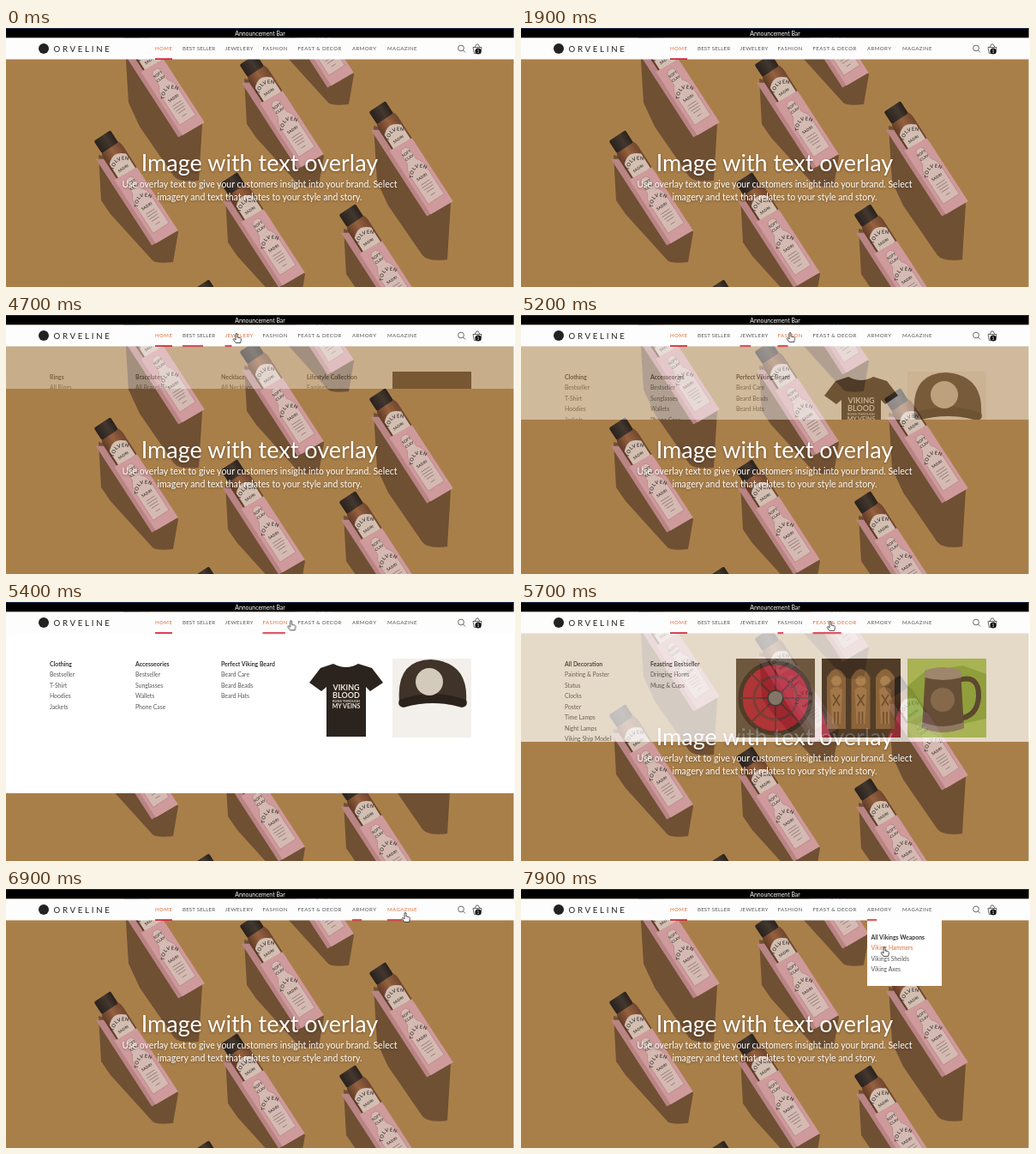
Write an HTML page that moves like this. It is 594 by 302 pixels and loops after 8 s.

```html
<!DOCTYPE html>
<html lang="en">
<head>
<meta charset="utf-8">
<title>Shop menu</title>
<style>
html, body { margin: 0; width: 100%; height: 100%; overflow: hidden; background: #fff; }
.stage { position: relative; width: 594px; height: 302px; overflow: hidden; font-family: Lato, "Open Sans", sans-serif; }
.stage > svg { position: absolute; left: 0; top: 0; display: block; }
.mid { text-anchor: middle; }

.copy { fill: #fff; text-shadow: 0 1px 3px rgba(50, 25, 0, .45); }
.label { font-size: 5.8px; font-weight: 700; fill: #453a37; letter-spacing: .4px; }
.label .small { font-size: 4.4px; letter-spacing: .2px; }

.nav text { font-size: 6.1px; letter-spacing: .4px; fill: #555; }
.nav .now { fill: #d9713a; }
.bar { fill: #d3182c; transform-box: fill-box; transform-origin: 0 0; }

.stage > .menu { top: 36px; background: #fff; opacity: 0; }
.menu text { font-size: 6.8px; fill: #555; }
.menu .head { font-size: 6.9px; font-weight: 700; fill: #333; }
.menu .tee text { font-weight: 700; fill: #eee6da; }
.stage > .drop { left: 404px; }

/* One shared 8 s clock */
.nav .link, .nav .bar, .menu, .pick, .cursor { animation: 8s linear infinite; }
.nav .now, .nav .home { animation: none; }
.best.link { animation-name: best-ink; }    .best.bar { animation-name: best-bar; }
.jewel.link { animation-name: jewel-ink; }  .jewel.bar { animation-name: jewel-bar; }
.fash.link { animation-name: fash-ink; }    .fash.bar { animation-name: fash-bar; }
.feast.link { animation-name: feast-ink; }  .feast.bar { animation-name: feast-bar; }
.arm.link { animation-name: arm-ink; }      .arm.bar { animation-name: arm-bar; }
.mag.link { animation-name: mag-ink; }      .mag.bar { animation-name: mag-bar; }
.menu.jewels { animation-name: jewel-menu; }
.menu.fashion { animation-name: fash-menu; }
.menu.decor { animation-name: feast-menu; }
.menu.drop { animation-name: arm-menu; }
.menu .pick { animation-name: pick; }
.cursor { animation-name: move; }

@keyframes best-ink  { 0%, 51.25% { fill: #555 } 52.5%, 57% { fill: #d9713a } 58.3%, 100% { fill: #555 } }
@keyframes jewel-ink { 0%, 57.5% { fill: #555 } 58.75%, 62.25% { fill: #d9713a } 63.5%, 100% { fill: #555 } }
@keyframes fash-ink  { 0%, 62.875% { fill: #555 } 64.1%, 67.5% { fill: #d9713a } 68.75%, 100% { fill: #555 } }
@keyframes feast-ink { 0%, 68% { fill: #555 } 69.25%, 77.75% { fill: #d9713a } 79%, 100% { fill: #555 } }
@keyframes arm-ink   { 0%, 78.125% { fill: #555 } 79.4%, 83.25% { fill: #d9713a } 84.5%, 90.6% { fill: #555 }
                       91.9%, 95.75% { fill: #d9713a } 97%, 100% { fill: #555 } }
@keyframes mag-ink   { 0%, 83.75% { fill: #555 } 85%, 90.25% { fill: #d9713a } 91.5%, 100% { fill: #555 } }

@keyframes best-bar  { 0%, 51.25% { transform: scaleX(0) } 56.25%, 57% { transform: scaleX(1) } 62%, 100% { transform: scaleX(0) } }
@keyframes jewel-bar { 0%, 57.5% { transform: scaleX(0) } 62.25% { transform: scaleX(.95) } 67%, 100% { transform: scaleX(0) } }
@keyframes fash-bar  { 0%, 62.875% { transform: scaleX(0) } 67.5% { transform: scaleX(.93) } 72.5%, 100% { transform: scaleX(0) } }
@keyframes feast-bar { 0%, 68% { transform: scaleX(0) } 73%, 77.75% { transform: scaleX(1) } 82.75%, 100% { transform: scaleX(0) } }
@keyframes arm-bar   { 0%, 78.125% { transform: scaleX(0) } 83.125%, 83.25% { transform: scaleX(1) } 88.25%, 90.625% { transform: scaleX(0) }
                       95.625%, 95.75% { transform: scaleX(1) } 100% { transform: scaleX(.15) } }
@keyframes mag-bar   { 0%, 83.75% { transform: scaleX(0) } 88.75%, 90.25% { transform: scaleX(1) } 95.25%, 100% { transform: scaleX(0) } }

@keyframes jewel-menu {
  0%, 57.5% { opacity: 0; clip-path: inset(0 0 226px 0) }
  58.75% { opacity: .36 }
  62.24% { opacity: 1; clip-path: inset(0 0 41px 0) }
  62.25%, 100% { opacity: 0; clip-path: inset(0 0 226px 0) }
}
@keyframes fash-menu {
  0%, 62.875% { opacity: 0; clip-path: inset(0 0 226px 0) }
  67.5% { opacity: 1; clip-path: inset(0 0 40px 0) }
  67.9% { opacity: 1; clip-path: inset(0 0 24px 0) }
  67.91%, 100% { opacity: 0; clip-path: inset(0 0 226px 0) }
}
@keyframes feast-menu {
  0%, 68% { opacity: 0; clip-path: inset(0 0 226px 0) }
  72.625% { opacity: 1 }
  73.81%, 77.74% { opacity: 1; clip-path: inset(0 0 0 0) }
  77.75%, 100% { opacity: 0; clip-path: inset(0 0 226px 0) }
}
@keyframes arm-menu {
  0%, 78.125% { opacity: 0; clip-path: inset(0 0 77px 0) }
  82.5%, 83.24% { opacity: 1; clip-path: inset(0 0 0 0) }
  83.25%, 90.625% { opacity: 0; clip-path: inset(0 0 77px 0) }
  95%, 100% { opacity: 1; clip-path: inset(0 0 0 0) }
}
@keyframes pick { 0%, 97.6% { fill: #555 } 98.6%, 100% { fill: #d9713a } }
@keyframes move {
  0%, 48.125% { transform: translate(214px, -14px) }
  51% { transform: translate(222px, 20px) }
  56% { transform: translate(228px, 23px) }
  57.25% { transform: translate(255px, 23px) }
  58.75% { transform: translate(269px, 22px) }
  61.5% { transform: translate(284px, 22px) }
  62.875% { transform: translate(300px, 21px) }
  65% { transform: translate(314px, 21px) }
  67.25% { transform: translate(328px, 22px) }
  68% { transform: translate(341px, 23px) }
  71.25% { transform: translate(361px, 23px) }
  76.9% { transform: translate(388px, 24px) }
  78.125% { transform: translate(405px, 24px) }
  82.5% { transform: translate(429px, 25px) }
  83.75% { transform: translate(446px, 26px) }
  86.25% { transform: translate(466px, 28px) }
  88.75% { transform: translate(464px, 28px) }
  90.6% { transform: translate(430px, 27px) }
  95% { transform: translate(423px, 32px) }
  96.25% { transform: translate(423px, 46px) }
  98.75%, 100% { transform: translate(424px, 68px) }
}
</style>
</head>
<body>
<div class="stage">

<svg class="hero" width="594" height="302">
  <defs>
    <linearGradient id="glass"><stop offset="0" stop-color="#5f3a26"/><stop offset=".5" stop-color="#96613f"/><stop offset="1" stop-color="#6e452e"/></linearGradient>
    <linearGradient id="cap"><stop offset="0" stop-color="#2a211d"/><stop offset=".6" stop-color="#43382f"/><stop offset="1" stop-color="#2a211d"/></linearGradient>
    <path id="arc" d="M-11 33Q0 20 11 33"/>
    <path id="arch" d="M-11 85Q-1 68 9 85"/>
    <!-- origin: centre of the cap, axis pointing down -->
    <g id="bottle">
      <path d="M-21 10L-13 15V44H14V132L-21 130Z" fill="#b98484"/>
      <path d="M-9 4H10Q14 9 14 15V48H-13V15Q-13 9 -9 4Z" fill="url(#glass)"/>
      <rect x="-11.5" y="-9" width="23" height="17" rx="2" fill="url(#cap)"/>
      <path d="M-11 44V24Q0 12 12 24V44Z" fill="#d2bfb2"/>
      <path d="M-16 42L14 44V132L-16 130.500Z" fill="#cf9a9b"/>
      <path d="M-7 67V53L-4 49H2L5 53V67Q10 72 10 80V119H-12V80Q-12 72 -7 67Z" fill="#d4bab2" stroke="#b98486" stroke-width=".7"/>
      <g class="label mid">
        <text><textPath href="#arc" startOffset="50%">TOLVEN</textPath></text>
        <text class="small" y="38">SADRI</text>
        <text class="small" x="-1" y="57">SOFT</text><text class="small" x="-1" y="63">CLAY</text>
        <text><textPath href="#arch" startOffset="50%">TOLVEN</textPath></text>
        <text class="small" x="-1" y="90">SADRI</text>
      </g>
      <path d="M-7 96H5M-8 99.500H6M-7 103H5M-6 106.500H4M-4 112H2" stroke="#8b7772" stroke-width=".8"/>
    </g>
    <g id="item"><path d="M-9 15L-6 68L5 84L54 138Q58 142 78 140L84 105L30 25Z" fill="#6f5033"/><use href="#bottle" transform="rotate(-33)"/></g>
    <g id="tall"><path d="M-9 15L-5 80L8 108L48 166Q55 174 77 171L81 105L30 25Z" fill="#6f5033"/><use href="#bottle" transform="rotate(-33)"/></g>
  </defs>
  <rect width="594" height="302" fill="#a97f49"/>
  <use href="#item" x="322" y="-51"/>
  <use href="#tall" x="148" y="7"/>
  <use href="#item" x="287" y="44"/>
  <use href="#tall" x="438" y="99"/>
  <use href="#item" x="117" y="133"/>
  <use href="#item" x="265" y="182"/>
  <use href="#item" x="403" y="219"/>
  <use href="#item" x="232" y="307"/>
  <g class="copy mid">
    <text x="296" y="166.500" font-size="27">Image with text overlay</text>
    <g font-size="10.5">
      <text x="296" y="186">Use overlay text to give your customers insight into your brand. Select</text>
      <text x="296" y="200.500">imagery and text that relates to your style and story.</text>
    </g>
  </g>
</svg>

<svg class="menu jewels" width="594" height="226" viewBox="0 36 594 226">
  <text class="head" x="51" y="74.5">Rings</text><text class="head" x="151" y="74.5">Bracelates</text><text class="head" x="251" y="74.5">Necklace</text><text class="head" x="351" y="74.5">Lifestyle Collection</text>
  <text x="51" y="87.3">All Rings</text><text x="151" y="87.3">All Bracelates</text><text x="251" y="87.3">All Necklace</text><text x="351" y="87.3">Earrings</text>
  <rect x="451" y="66" width="92" height="92" fill="#20160d"/>
</svg>

<svg class="menu fashion" width="594" height="226" viewBox="0 36 594 226">
  <text class="head" x="51" y="74.5">Clothing</text>
  <text x="51" y="87.3">Bestseller</text><text x="51" y="99.8">T-Shirt</text><text x="51" y="112.3">Hoodies</text><text x="51" y="124.8">Jackets</text>
  <text class="head" x="151" y="74.5">Accesseories</text>
  <text x="151" y="87.3">Bestseller</text><text x="151" y="99.8">Sunglasses</text><text x="151" y="112.3">Wallets</text><text x="151" y="124.8">Phone Case</text>
  <text class="head" x="251" y="74.5">Perfect Viking Beard</text>
  <text x="251" y="87.3">Beard Care</text><text x="251" y="99.8">Beard Beads</text><text x="251" y="112.3">Beard Hats</text>
  <g class="tee mid">
    <path d="M382 72Q397 80 411 72L427 77L440 94L425 104L420 99V157H374V99L368 104L354 94L367 77Z" fill="#2b231d"/>
    <text x="397" y="103" style="font-size:9px">VIKING</text>
    <text x="397" y="112" style="font-size:9px">BLOOD</text>
    <text x="397" y="117" style="font-size:4px">RUNS THROUGH</text>
    <text x="397" y="124" style="font-size:7px">MY VEINS</text>
  </g>
  <rect x="451" y="66" width="92" height="92" fill="#f3f0ec"/>
  <path d="M459 116Q455 68 496 67Q540 70 537 116Q498 104 459 116Z" fill="#40342a"/>
  <path d="M459 114Q498 100 537 114Q540 122 532 123Q498 113 464 123Q456 122 459 114Z" fill="#2b221b"/>
  <circle cx="494" cy="93" r="16" fill="#d3cabb"/>
</svg>

<svg class="menu decor" width="594" height="226" viewBox="0 36 594 226">
  <text class="head" x="51" y="74.5">All Decoration</text>
  <text x="51" y="87.3">Painting &amp; Poster</text><text x="51" y="99.8">Status</text><text x="51" y="112.3">Clocks</text><text x="51" y="124.8">Poster</text>
  <text x="51" y="137.3">Time Lamps</text><text x="51" y="149.8">Night Lamps</text><text x="51" y="162.3">Viking Ship Model</text>
  <text class="head" x="151" y="74.5">Feasting Bestseller</text>
  <text x="151" y="87.3">Dringing Horns</text><text x="151" y="99.8">Musg &amp; Cups</text>
  <!-- shield -->
  <rect x="251" y="66" width="92" height="92" fill="#54483a"/>
  <circle cx="297" cy="112" r="41" fill="#b3162e" stroke="#2b211b" stroke-width="5"/>
  <path d="M297 71V153M256 112H338M268 83L326 141M268 141L326 83" stroke="#56202a" stroke-width="2"/>
  <circle cx="297" cy="112" r="25" fill="none" stroke="#6b2330" stroke-width="3"/>
  <circle cx="297" cy="112" r="9" fill="#8d8580" stroke="#3a302b" stroke-width="2"/>
  <!-- carvings -->
  <rect x="351" y="66" width="92" height="92" fill="#2d2219"/>
  <path d="M351 128L362 158H351ZM443 122L428 158H443Z" fill="#a01f35"/>
  <g id="carve">
    <path d="M357 148V88Q368 68 379 88V148Z" fill="#805a35"/>
    <circle cx="368" cy="92" r="6" fill="#ad8252"/>
    <path d="M361 102Q368 96 375 102L373 142H363Z" fill="#a0754a"/>
    <path d="M364 108L372 121M372 108L364 121M366 128V142M370 128V142" stroke="#573a20" stroke-width="1.6"/>
  </g>
  <use href="#carve" x="28.5"/><use href="#carve" x="57"/>
  <!-- mug -->
  <rect x="451" y="66" width="92" height="92" fill="#86ad38"/>
  <path d="M451 66H543V84L515 74L470 82L451 98ZM451 140L480 150L543 136V158H451Z" fill="#a9c95a"/>
  <path d="M511 91Q535 84 534 111Q532 135 509 136" fill="none" stroke="#3e3027" stroke-width="6"/>
  <path d="M472 81H513L517 146Q494 157 468 146Z" fill="#4b3a2e"/>
  <path d="M471 80Q492 72 514 80V88Q492 94 471 88Z" fill="#988a7c"/>
  <path d="M468 140Q493 150 517 140V147Q494 157 468 147Z" fill="#85776a"/>
  <circle cx="492" cy="114" r="14" fill="#77604b"/>
</svg>

<svg class="menu drop" width="87" height="77" viewBox="404 36 87 77">
  <text class="head" x="408.5" y="58.5">All Vikings Weapons</text>
  <text class="pick" x="408.5" y="71.3">Viking Hammers</text>
  <text x="408.5" y="83.8">Vikings Sheilds</text>
  <text x="408.5" y="96.3">Viking Axes</text>
</svg>

<svg class="nav" width="594" height="302">
  <rect x="592.5" width="1.5" height="302" fill="#fff"/>
  <rect width="592.5" height="11.5" fill="#000"/>
  <rect width="592.5" height="1" fill="#1c2c4c"/>
  <rect y="11.5" width="594" height="25" fill="#fefdfe"/>
  <text class="mid" x="296.5" y="8.7" style="font-size:6.9px;letter-spacing:0;fill:#fff">Announcement Bar</text>
  <circle cx="44" cy="24" r="6" fill="#222"/>
  <text x="55.5" y="27.5" style="font-size:9.7px;letter-spacing:2.7px;fill:#222">ORVELINE</text>

  <text class="now" x="174" y="26.3">HOME</text>
  <text class="best link" x="206" y="26.3" style="letter-spacing:.2px">BEST SELLER</text>
  <text class="jewel link" x="255.5" y="26.3">JEWELERY</text>
  <text class="fash link" x="299.5" y="26.3">FASHION</text>
  <text class="feast link" x="340.5" y="26.3">FEAST &amp; DECOR</text>
  <text class="arm link" x="404" y="26.3">ARMORY</text>
  <text class="mag link" x="445" y="26.3">MAGAZINE</text>
  <g transform="translate(0 35.3)">
    <rect class="bar home" x="174" width="20" height="1.6"/>
    <rect class="best bar" x="206" width="37" height="1.6"/>
    <rect class="jewel bar" x="255.5" width="32" height="1.6"/>
    <rect class="fash bar" x="299.5" width="28.5" height="1.6"/>
    <rect class="feast bar" x="340.5" width="51" height="1.6"/>
    <rect class="arm bar" x="404" width="28.5" height="1.6"/>
    <rect class="mag bar" x="445" width="35" height="1.6"/>
  </g>

  <g fill="none" stroke="#444" stroke-width=".8">
    <circle cx="531" cy="23.5" r="3.4"/><path d="M533.5 26L536 28.5"/>
    <path d="M545 22.5H555L553.7 29.5H546.3ZM547 22.5L549 19H551L553 22.5"/>
  </g>
  <circle cx="551" cy="27" r="3.6" fill="#111"/>
  <text class="mid" x="551" y="28.8" style="font-size:5px;letter-spacing:0;fill:#fff">1</text>

  <path class="cursor" fill="#fff" stroke="#222" stroke-width=".8" stroke-linejoin="round"
    d="M-1 0Q0 -1 1 0V4L4.5 4.8Q5.5 5.2 5.4 6.5L4.6 10.5H-1L-3.8 6.6Q-3.6 5.2 -2.4 5.8L-1 7Z"/>
</svg>

</div>
</body>
</html>
```
